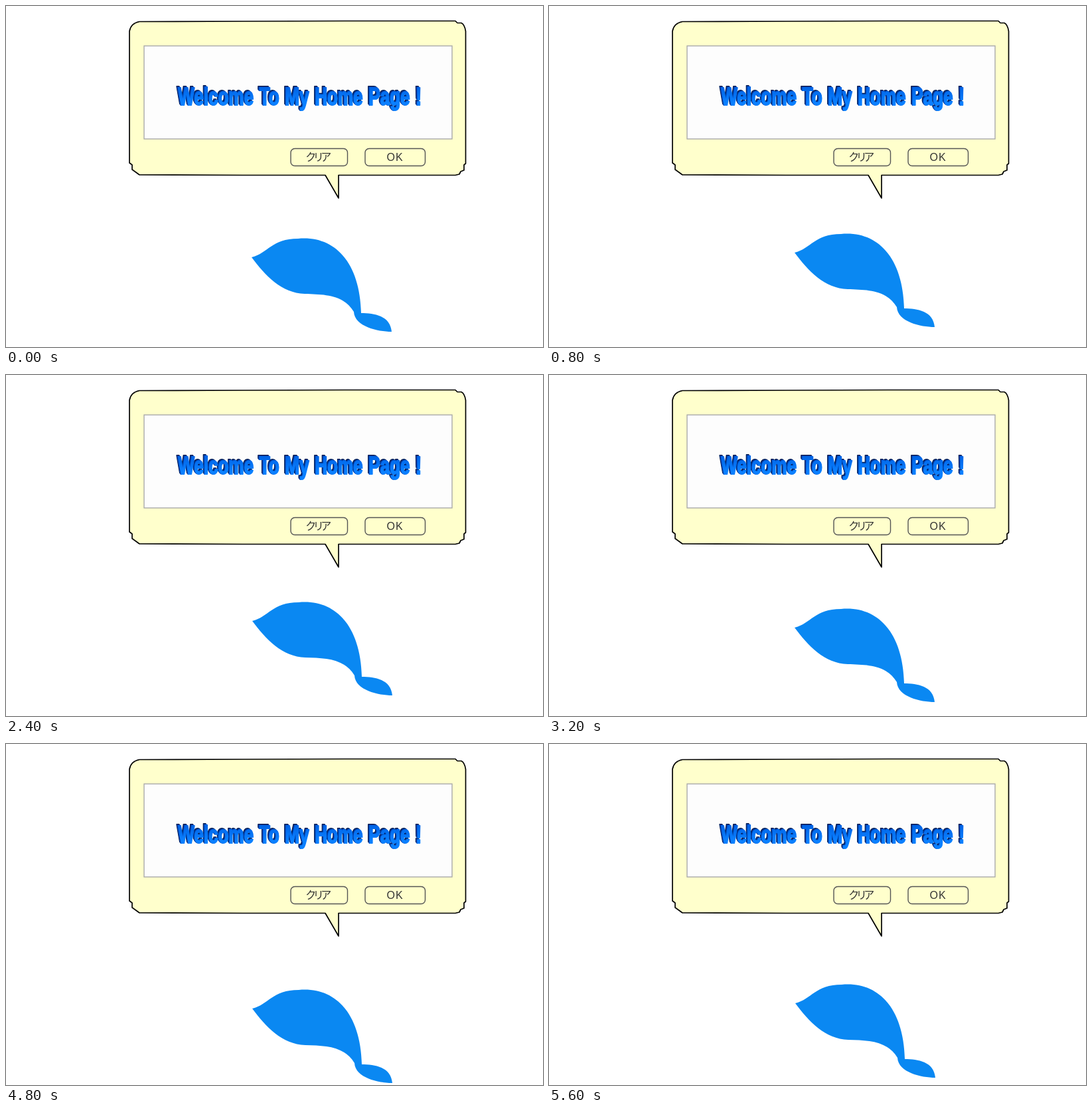
Animation of 809 by 513 pixels, one loop 6.4 s. Source, as an HTML page:

```html
<!DOCTYPE html>
<html lang="ja">
<head>
<meta charset="utf-8">
<title>Welcome</title>
<style>
  html, body { margin: 0; width: 100%; height: 100%; overflow: hidden; background: #fff; }
  svg { display: block; }
  .title { font: bold 26px "Liberation Sans", Arial, sans-serif; word-spacing: 1.6px; stroke-width: 1.3; stroke-linejoin: round; }
  .label { fill: #333; text-anchor: middle; }
</style>
</head>
<body>
<svg width="809" height="513" viewBox="0 0 809 513">
  <defs>
    <linearGradient id="face" x1="0" y1="0" x2="0" y2="1">
      <stop offset=".2" stop-color="#0064e6"/>
      <stop offset=".7" stop-color="#0a80ff"/>
    </linearGradient>
    <text id="welcome" class="title" transform="translate(259.500 148.500) scale(1 1.42)">Welcome To My Home Page !</text>
  </defs>

  <path fill="#ffffcc" stroke="#000" stroke-width="1.7" stroke-linejoin="round"
    d="M201 23.500L360 23L515 22.500H677L680 25.500H686Q691 28 692.500 38V237L690 239V247L685 249L683 253L677 254.500H501V289L481 254.500H357L201 254L190 246V239L186 236V38Q188 26 201 23.500Z"/>
  <rect x="208" y="60" width="464" height="140" fill="#fdfdfd" stroke="#aaa" stroke-width="1.4"/>

  <use href="#welcome" x="-2.500" y="-1.500" fill="#001c50" stroke="#001c50"/>
  <use href="#welcome" x="-1.700" y="-1" fill="#002f86" stroke="#002f86"/>
  <use href="#welcome" x="-1" fill="#0044b4" stroke="#0044b4"/>
  <use href="#welcome" fill="url(#face)" stroke="url(#face)"/>

  <g fill="none" stroke="#555" stroke-width="1.4">
    <rect x="429" y="214.500" width="85.500" height="26" rx="6"/>
    <rect x="541" y="214.500" width="90.500" height="26" rx="6"/>
  </g>
  <text class="label" x="468.500" y="233" font-family="'Noto Sans CJK JP', 'Noto Sans CJK', sans-serif" font-size="16" font-weight="300" letter-spacing="-4.500">クリア</text>
  <text class="label" x="586" y="233" font-family="'Liberation Sans', Arial, sans-serif" font-size="16" letter-spacing="1">OK</text>

  <path id="swimmer" fill="#0a88f2"
    d="M370 378C395 372 400 350 440 350C495 345 533 385 535 462C555 462 579 466 581 490C560 490 525 482 524 460C508 434 480 434 450 433C415 432 390 405 370 378Z"/>
</svg>
<script>
  const STEP = 800;
  const bobX = [0, 0, 0, 1, 0, 1, 1, 1];
  const bobY = [0, -7, -15, -8, 2, 11, 20, 12];
  const swimmer = document.getElementById("swimmer");
  const start = performance.now();

  function draw() {
    const i = Math.floor((performance.now() - start) / STEP) % bobY.length;
    swimmer.setAttribute("transform", `translate(${bobX[i]} ${bobY[i]})`);
    requestAnimationFrame(draw);
  }
  draw();
</script>
</body>
</html>
```
